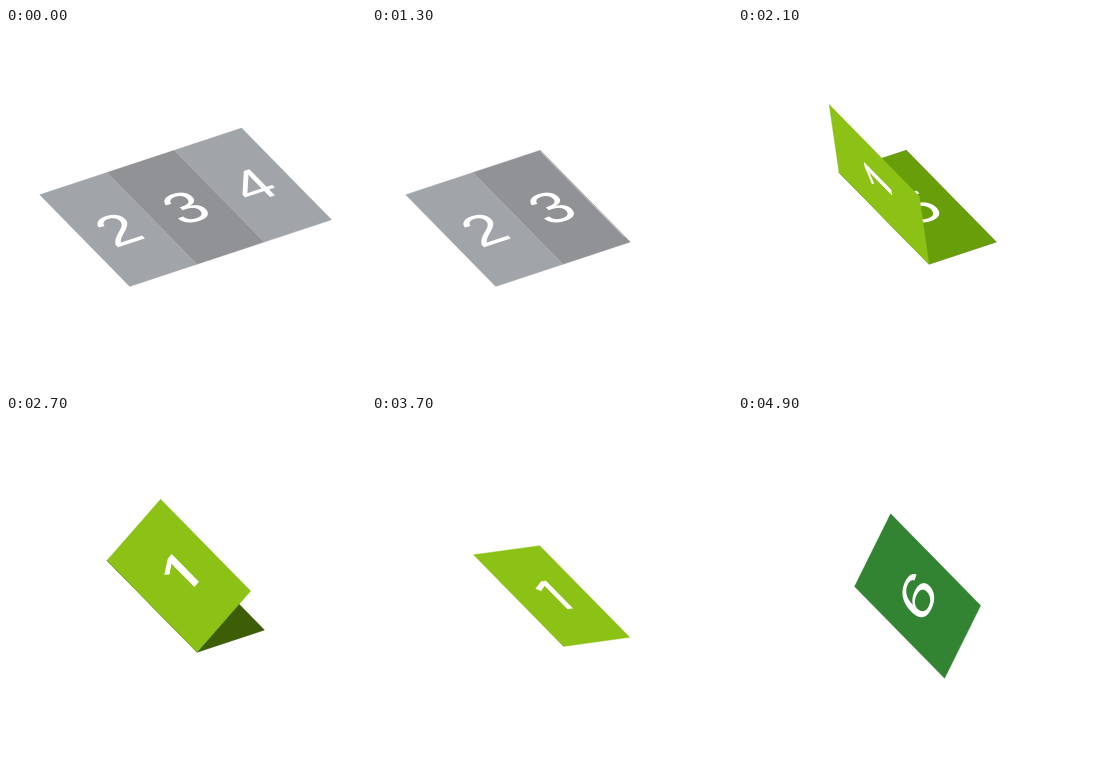
An HTML page for the animation above (5 s loop, 360x360 px).

```html
<!DOCTYPE html>
<html lang="en">
<head>
<meta charset="utf-8">
<title>Folding leaflet</title>
<style>
  html, body { margin: 0; width: 100%; height: 100%; overflow: hidden; background: #fff; }
  svg { display: block; width: 100vw; height: 100vh; }
  rect { stroke-width: 0.6; }
  text { font-family: "Liberation Sans", Arial, sans-serif; font-size: 87px; fill: #fff; text-anchor: middle; }
  .one { font-family: "Open Sans", "Noto Sans", sans-serif; stroke: #fff; stroke-width: 1.5; }
</style>
</head>
<body>
<svg id="stage" viewBox="0 0 360 360"></svg>
<script>
const NS = "http://www.w3.org/2000/svg";
const stage = document.getElementById("stage");
const LOOP = 5000, STEP = 100;
const RIGHT_TURN = 9.9, LEFT_TURN = 10.2, ROLL_TURN = 10.2;   // degrees per step
const PAGE_W = 99, PAGE_H = 210;

// Projected axes: across a panel, along its fold, straight up
const U = [67.3, -22.2], V = [90, 91.7], W = [0, -72];
const HINGE_A = [101, 144.5], HINGE_B = [168.3, 122.3];
const PIVOT = [134.6, 134.2];   // top end of the axis the closed leaflet turns on

const add = (p, q, k = 1) => [p[0] + q[0] * k, p[1] + q[1] * k];
const clamp = (x, lo, hi) => Math.min(hi, Math.max(lo, x));

function make(tag, attrs, parent) {
  const el = document.createElementNS(NS, tag);
  for (const k in attrs) el.setAttribute(k, attrs[k]);
  return parent.appendChild(el);
}

function paint(page, shade) {
  const color = `rgb(${page.rgb.map(c => Math.round(c * shade))})`;
  page.rect.setAttribute("fill", color);
  page.rect.setAttribute("stroke", color);
}

function makePage(digit, rgb) {
  const g = make("g", {}, stage);
  const rect = make("rect", { width: PAGE_W, height: PAGE_H }, g);
  const isOne = digit === 1;
  const text = make("text", { x: PAGE_W / 2 + (isOne ? 6 : 0), y: 135.5 }, g);
  text.textContent = digit;
  if (isOne) text.setAttribute("class", "one");
  const page = { g, rect, rgb };
  paint(page, 1);
  return page;
}

const LIGHT = [161, 164, 168], MID = [145, 146, 150];
const LIME = [140, 193, 22], OLIVE = [105, 160, 10], GREEN = [50, 132, 50];

// Creation order is paint order
const p3 = makePage(3, MID), p6 = makePage(6, GREEN);
const p4 = makePage(4, LIGHT), p5 = makePage(5, OLIVE);
const p2 = makePage(2, LIGHT), p1 = makePage(1, LIME);
const edge = make("line", {
  x1: HINGE_B[0], y1: HINGE_B[1] + 1, x2: HINGE_B[0] + 84, y2: HINGE_B[1] + 86.5,
  stroke: "#c4c5c9", "stroke-width": 1
}, stage);

function show(el, on) {
  el.style.display = on ? "" : "none";
}

// Places a page with its top edge from a to b; it shows only when facing the viewer
function place(page, a, b) {
  const x = add(b, a, -1);
  const facing = (x[0] * V[1] - x[1] * V[0]) / Math.hypot(...V);
  const seen = facing > 2.6;
  show(page.g, seen);
  if (seen) {
    const m = [x[0] / PAGE_W, x[1] / PAGE_W, V[0] / PAGE_H, V[1] / PAGE_H, a[0], a[1]];
    page.g.setAttribute("transform", `matrix(${m.map(n => n.toFixed(4))})`);
  }
  return seen;
}

function sheet(front, back, left, right) {
  const frontSeen = place(front, left, right);
  const backSeen = place(back, right, left);
  return frontSeen || backSeen;
}

// Panel direction after rotating by deg; side is 1 for right, -1 for left
function swing(deg, side, lift = 1) {
  const r = deg * Math.PI / 180, c = side * Math.cos(r);
  return add([U[0] * c, U[1] * c], W, lift * Math.sin(r));
}

function draw(ms) {
  const n = Math.floor(ms / STEP);
  const foldRight = clamp(n * RIGHT_TURN, 0, 180);
  const foldLeft = clamp((n - 13) * LEFT_TURN, 0, 180);
  const held = n >= 41 ? 1 : 0;             // one-step pause in the turn
  const roll = Math.max(0, n - 36 - held) * ROLL_TURN;

  show(edge, false);
  if (foldLeft === 180) {
    for (const p of [p2, p3, p4, p5]) show(p.g, false);
    const across = swing(roll, 1, -1);
    sheet(p1, p6, add(PIVOT, across, -0.5), add(PIVOT, across, 0.5));
  } else {
    sheet(p3, p6, HINGE_A, HINGE_B);
    const seen = sheet(p4, p5, HINGE_B, add(HINGE_B, swing(foldRight, 1)));
    show(edge, !seen);
    sheet(p2, p1, add(HINGE_A, swing(foldLeft, -1)), HINGE_A);
  }

  // The page below darkens as the cover closes over it
  paint(p5, 1 - 0.4 * clamp((foldLeft - 80) / 60, 0, 1.2));
}

const start = performance.now();
function tick() {
  draw((performance.now() - start) % LOOP);
  requestAnimationFrame(tick);
}
draw(0);
requestAnimationFrame(tick);
</script>
</body>
</html>
```
